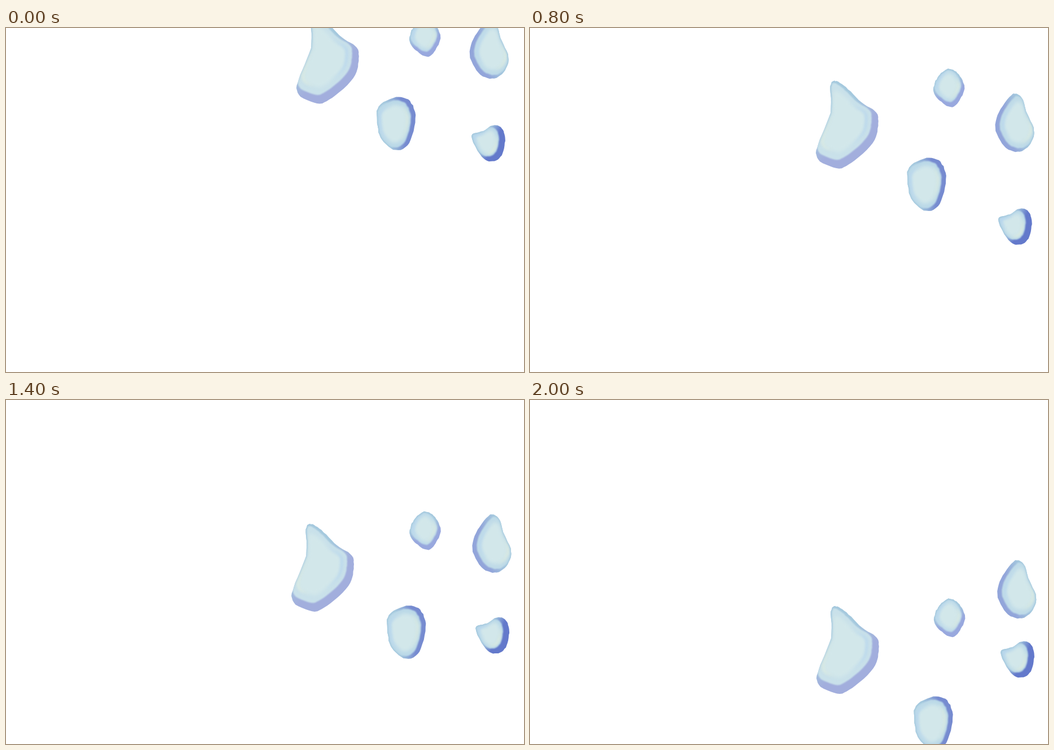
Write an HTML page with a canvas that moves like this. It is 917 by 611 pixels and loops after 2200 ms.

```html
<!DOCTYPE html>
<html lang="en">
<head>
<meta charset="utf-8">
<title>Water drops</title>
<style>
  html, body { margin: 0; width: 100%; height: 100%; overflow: hidden; background: #fff; }
  canvas { display: block; }
</style>
</head>
<body>
<canvas id="stage" width="917" height="611"></canvas>
<script>
const STEP = 200, STEPS = 11, TURN = 5;
const EDGE = '#a5c9de', CORE = '#d2e7ea', STREAK = '#b3d3ee', GLINT = '#e0eddf';

// path: position at the first, turning and last step; outline: key points of a smooth curve;
// shade, glint: directions of the dark rim and of the highlight; depth: rim thickness.
const drops = [
  { path: [[515, -21], [505, 123], [508, 366.5]], size: [110, 155],
    outline: [[34, 0], [52, 11], [80, 38], [106, 56], [109, 80], [100, 110], [62, 145], [36, 155], [3, 139], [3, 112], [25, 56], [25, 9]],
    shade: 0.85, depth: 16, rim: '#a2aedd', body: '#c9e1ea', glint: Math.PI },
  { path: [[714, -17], [714, 95], [715, 353]], size: [55, 68],
    outline: [[29, 0], [45, 10], [55, 32], [48, 53], [34, 68], [14, 59], [1, 42], [3, 24], [14, 8]],
    shade: 1.1, depth: 9, rim: '#98a8de', body: '#bddaea', glint: 0.3 },
  { path: [[820.5, -13], [824, 149.5], [827, 285]], size: [69, 103],
    outline: [[32, 0], [48, 8], [55, 31], [69, 65], [60, 92], [40, 103], [16, 93], [0, 60], [10, 27]],
    shade: 2.9, depth: 9, rim: '#92a5da', body: '#bfdbe8', glint: 0.2 },
  { path: [[657, 123], [671.5, 258], [680.5, 527]], size: [68, 94],
    outline: [[33, 0], [58, 7], [68, 38], [57, 81], [33, 94], [9, 76], [0, 46], [3, 16]],
    shade: -0.1, depth: 9, rim: '#768bd0', body: '#bbd9e8', glint: 0 },
  { path: [[824.5, 172], [830.5, 357], [833.5, 428]], size: [59, 65],
    outline: [[40, 0], [55, 9], [59, 28], [53, 54], [37, 65], [18, 57], [0, 20], [20, 11]],
    shade: 0.45, depth: 12, rim: '#6379cb', body: '#b9d8e8', glint: 0.6 }
];

const ctx = document.getElementById('stage').getContext('2d');

let seed = 7;
function random() {
  seed = seed * 16807 % 2147483647;
  return seed / 2147483647;
}

// Catmull-Rom curve through the key points, with a slightly bumpy edge.
function smoothPath(points, samples = 6, bump = 1.2) {
  const shape = new Path2D();
  const at = i => points[(i + points.length) % points.length];
  points.forEach((point, i) => {
    for (let s = 0; s < samples; s++) {
      const t = s / samples;
      const [x, y] = point.map((b, axis) => {
        const a = at(i - 1)[axis], c = at(i + 1)[axis], d = at(i + 2)[axis];
        const curve = b + t / 2 * (c - a + t * (2 * a - 5 * b + 4 * c - d + t * (3 * (b - c) + d - a)));
        return curve + (random() - 0.5) * bump;
      });
      shape.lineTo(x, y);
    }
  });
  shape.closePath();
  return shape;
}

function gradient(angle, radius, stops) {
  const x = Math.cos(angle) * radius, y = Math.sin(angle) * radius;
  const ramp = ctx.createLinearGradient(-x, -y, x, y);
  stops.forEach(([offset, color]) => ramp.addColorStop(offset, color));
  return ramp;
}

function fill(shape, color, blur) {
  ctx.filter = `blur(${blur}px)`;
  ctx.fillStyle = color;
  ctx.fill(shape);
}

function stroke(shape, color, width, blur) {
  ctx.filter = `blur(${blur}px)`;
  ctx.strokeStyle = color;
  ctx.lineWidth = width;
  ctx.stroke(shape);
}

function paint({ shape, size: [w, h], shade, depth, rim, body, glint }, [x, y]) {
  const radius = (w + h) / 4, inset = depth / 2;
  ctx.save();
  ctx.translate(x + w / 2, y + h / 2);
  ctx.fillStyle = gradient(shade, radius, [[0, EDGE], [0.3, EDGE], [0.65, rim], [1, rim]]);
  ctx.fill(shape);
  ctx.clip(shape);

  // The lit body is shrunk and pushed away from the shaded rim.
  ctx.translate(-Math.cos(shade) * inset, -Math.sin(shade) * inset);
  ctx.scale(1 - inset / radius, 1 - inset / radius);
  fill(shape, body, 1.2);
  ctx.save();
  ctx.scale(0.8, 0.8);
  fill(shape, CORE, 3);
  stroke(shape, gradient(glint, radius, [[0, STREAK], [0.4, STREAK + '00'], [0.7, GLINT + '00'], [1, GLINT]]), 6, 2);
  ctx.restore();
  ctx.restore();

  ctx.save();
  ctx.translate(x + w / 2, y + h / 2);
  ctx.clip(shape);
  stroke(shape, gradient(shade, radius, [[0, EDGE], [0.6, EDGE + '00']]), 4, 0.8);
  ctx.restore();
}

function positionAt(path, step) {
  const leg = step < TURN ? 0 : 1;
  const part = step / TURN - leg;
  return path[leg].map((value, axis) => value + (path[leg + 1][axis] - value) * part);
}

for (const drop of drops) {
  const [w, h] = drop.size;
  drop.shape = smoothPath(drop.outline.map(([x, y]) => [x - w / 2, y - h / 2]));
}

let shown = -1;
function draw() {
  const step = Math.floor(performance.now() / STEP) % STEPS;
  if (step !== shown) {
    shown = step;
    ctx.clearRect(0, 0, 917, 611);
    drops.forEach(drop => paint(drop, positionAt(drop.path, step)));
  }
  requestAnimationFrame(draw);
}
draw();
</script>
</body>
</html>
```
